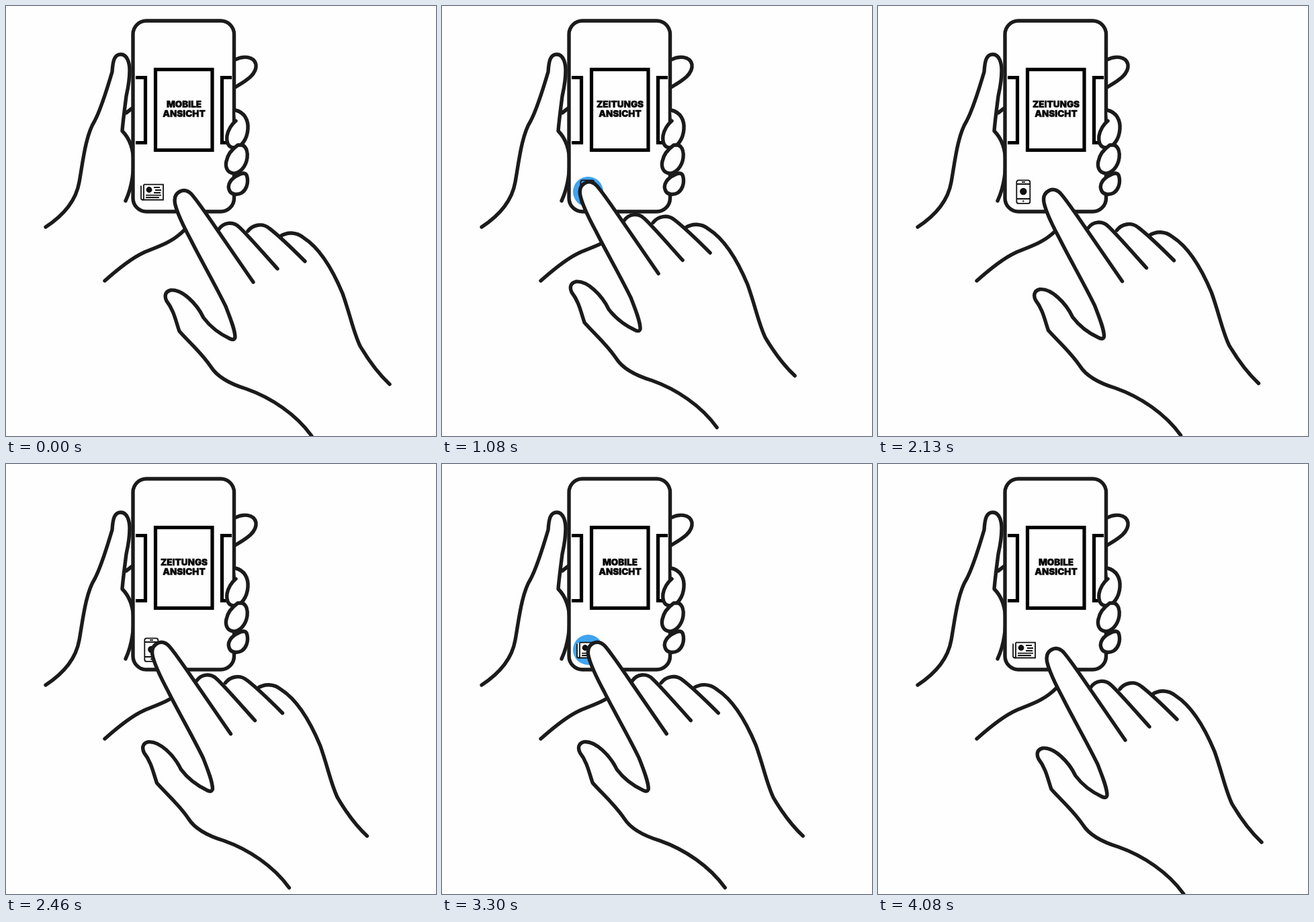
An HTML page that plays this animation: 640x640 px, repeating every 4140 ms.

```html
<!DOCTYPE html>
<html lang="de">
<head>
<meta charset="utf-8">
<title>Ansicht wechseln</title>
<style>
  html, body { margin: 0; width: 100%; height: 100%; overflow: hidden; background: #fefefe; }
  svg { display: block; width: 100%; height: 100%; }
  .line { fill: none; stroke: #1c1b1c; stroke-width: 5.4; stroke-linecap: round; stroke-linejoin: round; }
  .solid { fill: #fefefe; }
  .page { fill: none; stroke: #000; stroke-width: 5.2; }
  .icon { fill: none; stroke: #111; stroke-width: 1.8; }
  .label { font: 900 13.5px Inter, Roboto, sans-serif; text-anchor: middle; fill: #000; stroke: #000; stroke-width: .4; }
</style>
</head>
<body>
<svg viewBox="0 0 640 640">
  <!-- holding hand, behind the phone -->
  <g class="line">
    <path d="M59 329C85 312 104 291 109 262C114 235 118 193 132 171C141 154 150 125 158 98C159 82 161 72 171 72C181 72 184 86 184 96C184 112 181 125 179 134C177 150 174 172 173 186C184 197 190 215 190 235C189 260 185 275 178 290"/>
    <path d="M179 159L188 152"/>
    <path d="M341 80C352 74 369 74 372 87C374 102 356 112 341 121"/>
  </g>

  <rect class="line solid" x="189" y="22" width="150.5" height="284" rx="20"/>
  <g class="page">
    <path d="M193 106.5H207.5V203.5H193M336 106.5H321.5V203.5H332"/>
    <rect x="222.5" y="94.5" width="84.5" height="120"/>
  </g>
  <text id="word" class="label" x="265" y="151.3">MOBILE</text>
  <text class="label" x="265" y="165">ANSICHT</text>

  <circle id="tap" cx="217.5" cy="276.5" r="22.5" fill="#3fa4f0" opacity="0"/>
  <g id="paper" class="icon">
    <path class="solid" d="M205 265.7H234V288.5H203.5Q201 288.5 201 286V267.5"/>
    <path d="M205 265.7V286Q205 288.5 203 288.5M220 270H229M222 274H231M220 278H230M208 281.7H231M208 285H228"/>
    <circle cx="213" cy="273.5" r="4.4" fill="#111" stroke="none"/>
  </g>
  <g id="mobile" class="icon">
    <rect x="206.3" y="259.3" width="20" height="34.6" rx="3"/>
    <path d="M206.3 265H226.3M206.3 287H226.3M214 262.2H219"/>
    <circle cx="216.3" cy="290.4" r="1.2" fill="#111" stroke="none"/>
    <circle cx="216.3" cy="276" r="5.2" fill="#111" stroke="none"/>
  </g>

  <!-- fingertips around the right edge -->
  <g class="line solid">
    <path d="M341 155C355 158 361 170 360 183C359 198 350 211 340 211C330 211 328 202 329 193C331 183 336 176 342 171"/>
    <path d="M352 207C358 210 360 218 359 226C357 240 347 250 338 249C329 248 326 239 328 231C330 220 338 212 345 207Z"/>
    <path d="M345 252C351 248 358 247 359 255C361 265 357 274 351 278C344 282 334 281 332 273C329 265 336 256 345 252Z"/>
  </g>
  <path class="line" d="M147 409C165 393 185 376 205 367C225 358 245 354 266 333"/>

  <g id="hand" class="line solid">
    <path stroke="none" d="M317 332L360 335L408 343L571 563L455 640L340 480Z"/>
    <path d="M408 343C418 336 432 336 443 345C468 361 486 392 501 428C513 462 517 485 527 506C540 528 555 548 571 563"/>
    <path d="M360 335C367 326 381 322 392 331C405 341 425 360 445 380"/>
    <path d="M317 332C324 322 338 320 347 329C359 340 385 370 404 391"/>
    <path d="M368 411L315 334C300 312 285 290 276 280C271 275 265 273 259 276C251 280 250 288 252 296C256 312 268 335 275 348C290 378 312 416 327 447C334 465 341 482 341 493C340 497 337 497 333 495C318 488 303 476 294 464C284 443 262 421 245 423C236 425 236 433 239 439C250 453 253 470 258 484C272 500 290 515 305 537C315 553 335 563 358 570C395 583 432 608 455 640"/>
  </g>
</svg>
<script>
  const LOOP = 4140, TICK = 30, SLOPE = 0.277;
  // [ms, hand shift in x]
  const moves = [[0, 0], [750, -46], [1050, -46], [1980, 0], [2730, -47], [2860, -47], [4095, 0], [LOOP, 0]];
  // [ms, tap highlight]
  const glow = [[0, 0], [660, 0], [750, 1], [1260, 1], [1350, 0], [2730, 0], [2820, 1], [3300, 1], [3390, 0], [LOOP, 0]];
  const swap = [720, 2730];

  const $ = id => document.getElementById(id);
  const [word, tap, paper, mobile, hand] = ['word', 'tap', 'paper', 'mobile', 'hand'].map($);
  const linear = p => p;
  const sine = p => (1 - Math.cos(Math.PI * p)) / 2;

  function sample(keys, t, ease) {
    const i = keys.findIndex(k => k[0] > t);
    const [t0, a] = keys[i - 1], [t1, b] = keys[i];
    return a + (b - a) * ease((t - t0) / (t1 - t0));
  }

  function draw(now) {
    const t = Math.floor((now % LOOP) / TICK) * TICK;
    const x = sample(moves, t, sine);
    const news = t >= swap[0] && t < swap[1];
    hand.setAttribute('transform', `translate(${x.toFixed(2)} ${(x * SLOPE).toFixed(2)})`);
    tap.setAttribute('opacity', sample(glow, t, linear));
    word.textContent = news ? 'ZEITUNGS' : 'MOBILE';
    paper.style.display = news ? 'none' : '';
    mobile.style.display = news ? '' : 'none';
  }

  const start = performance.now();
  function loop() {
    draw(performance.now() - start);
    requestAnimationFrame(loop);
  }
  loop();
</script>
</body>
</html>
```
